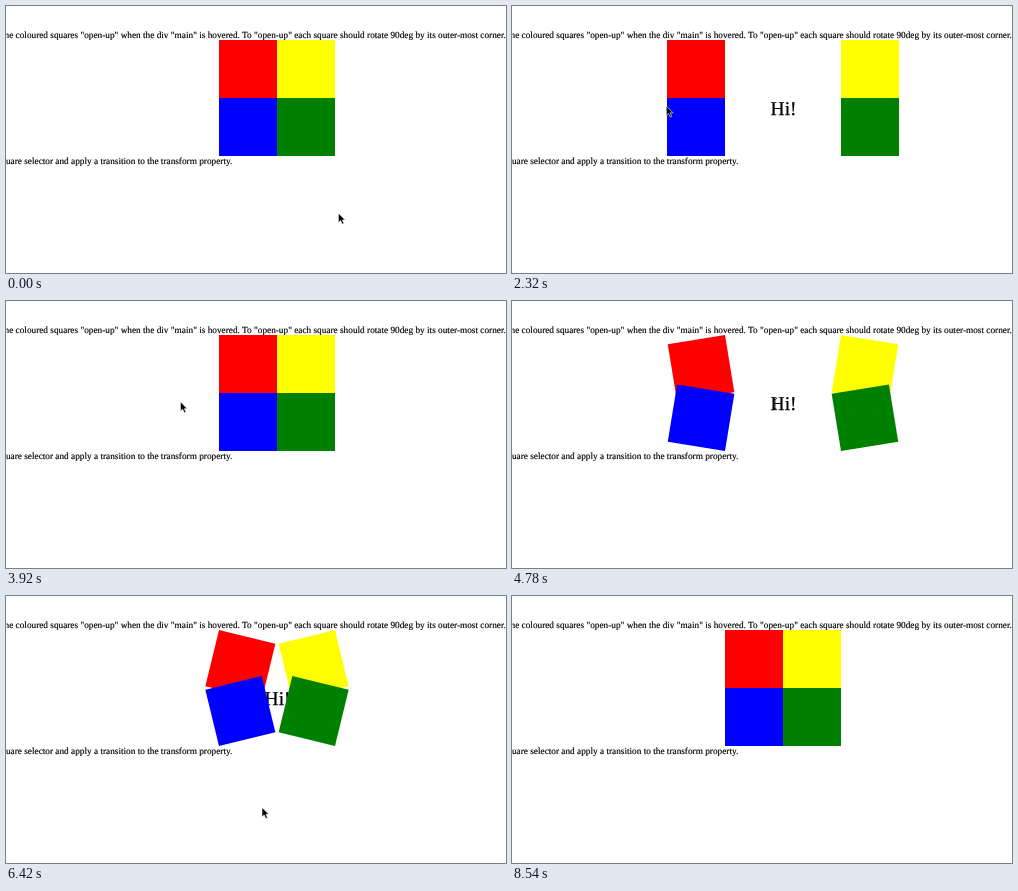
Recreate the animation shown at these times as an HTML page. Size 500x267 px, loop 8.62 s.

```html
<!DOCTYPE html>
<html lang="en">
<head>
<meta charset="utf-8">
<title>Opening squares</title>
<style>
html, body { margin: 0; width: 100%; height: 100%; overflow: hidden; background: #fff; }
svg { display: block; width: 100%; height: 100%; }
text {
  font: 9.28px "Liberation Serif", Times, serif; text-rendering: geometricPrecision;
  text-anchor: end; stroke: #000; stroke-width: .15px;
}
#hi { font-size: 19.5px; text-anchor: middle; stroke-width: .25px; }
</style>
</head>
<body>
<svg viewBox="0 0 500 267">
  <text x="499.8" y="31.8">the coloured squares "open-up" when the div "main" is hovered. To "open-up" each square should rotate 90deg by its outer-most corner.</text>
  <text x="226.3" y="157.8">square selector and apply a transition to the transform property.</text>
  <text id="hi" x="271.6" y="109.2">Hi!</text>
  <g id="squares"></g>
  <path id="arrow" d="M0 0V9.4L2.2 7.4L3.8 11L5.5 10.2L3.9 6.8H6.8Z" stroke="#fff" stroke-width=".6"/>
  <path id="beam" d="M-2 -5.5Q0 -5.5 0 -4Q0 -5.5 2 -5.5M0 -4V4M-2 5.5Q0 5.5 0 4Q0 5.5 2 5.5" fill="none" stroke="#000" stroke-width=".8"/>
</svg>
<script>
const LOOP = 8620, TURN = 1000;
const SIDE = 58, CX = 271, CY = 92;
const $ = id => document.getElementById(id);

// Each square turns about its outermost corner; sx and sy give its side of the centre.
const squares = ["red", "yellow", "blue", "green"].map((fill, i) => {
  const sx = i % 2 * 2 - 1, sy = i < 2 ? -1 : 1;
  const el = document.createElementNS("http://www.w3.org/2000/svg", "rect");
  const attrs = {
    fill, width: SIDE, height: SIDE,
    x: Math.min(CX, CX + sx * SIDE),
    y: Math.min(CY, CY + sy * SIDE)
  };
  for (const name in attrs) el.setAttribute(name, attrs[name]);
  $("squares").append(el);
  return { el, dir: sx * sy, pivot: `${CX + sx * SIDE} ${CY + sy * SIDE}` };
});

// Times at which the hover state flips, starting closed
const flips = [478, 2415, 4163, 5870, 7200, 7440];

// Pointer stops: time, x, y
const stops = [
  [0, 332.5, 207.3], [860, 257, 81.5], [1700, 257, 81.5],
  [2330, 152.8, 100.3], [3755, 152.8, 100.3],
  [4600, 263, 103], [5650, 263, 103],
  [6130, 256, 211.5], [7060, 256, 211.5], [7560, 300, -14]
];

// CSS "ease": cubic-bezier(.25, .1, .25, 1)
function ease(x) {
  if (x >= 1) return 1;
  const curve = (s, a, b) => 3 * s * (1 - s) ** 2 * a + 3 * s * s * (1 - s) * b + s ** 3;
  let lo = 0, hi = 1;
  for (let i = 0; i < 24; i++) {
    const mid = (lo + hi) / 2;
    if (curve(mid, .25, .25) < x) lo = mid; else hi = mid;
  }
  return curve(lo, .1, 1);
}

// Every flip eases on from the angle reached so far.
function angleAt(t) {
  return flips.filter(start => start <= t).reduce((angle, start, i) => {
    const end = Math.min(t, flips[i + 1] ?? LOOP);
    const target = i % 2 ? 0 : 90;
    return angle + (target - angle) * ease((end - start) / TURN);
  }, 0);
}

function pointerAt(t) {
  const i = stops.findLastIndex(stop => stop[0] <= t);
  const [t0, x0, y0] = stops[i], [t1, x1, y1] = stops[i + 1] ?? [LOOP, x0, y0];
  const k = (t - t0) / (t1 - t0);
  return [x0 + (x1 - x0) * k, y0 + (y1 - y0) * k];
}

function draw(t) {
  const angle = angleAt(t);
  for (const { el, dir, pivot } of squares)
    el.setAttribute("transform", `rotate(${-dir * -angle} ${pivot})`);

  const [x, y] = pointerAt(t);
  const overText = angle > 60 && Math.abs(x - 271.5) < 13.5 && Math.abs(y - 103) < 10;
  for (const id of ["arrow", "beam"]) {
    $(id).setAttribute("transform", `translate(${x} ${y})`);
    $(id).style.display = (id === "beam") === overText ? "" : "none";
  }
}

const begin = performance.now();
function tick() {
  draw((performance.now() - begin) % LOOP);
  requestAnimationFrame(tick);
}
tick();
</script>
</body>
</html>
```
